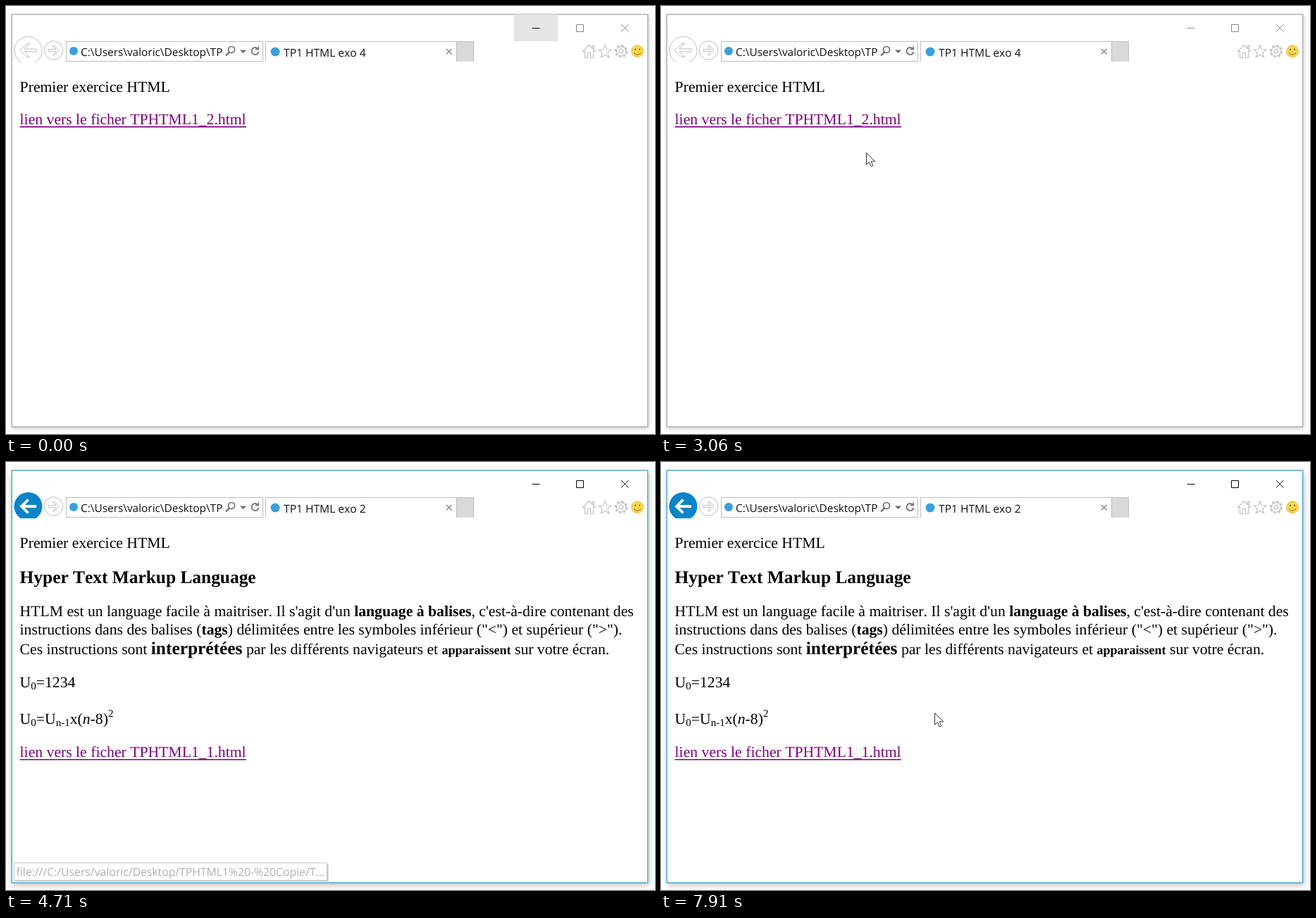
Animation of 921 by 608 pixels, one loop 8 s. Source, as an HTML page:

```html
<!DOCTYPE html>
<html lang="fr">
<head>
<meta charset="utf-8">
<title>TP1 HTML</title>
<style>
html, body { margin: 0; width: 100%; height: 100%; overflow: hidden; background: #fff; }
svg { position: absolute; left: 0; top: 0; }
.win {
  position: absolute; left: 8px; top: 12px; width: 903px; height: 586px;
  background: #fff;
  animation: shadow 8s step-end infinite;
}
.frame { fill: none; stroke-width: 1.4; animation: frame 8s step-end infinite; }
.ui { font-family: "Open Sans", "Noto Sans", sans-serif; fill: #111; }
.doc { font: 21.7px "Liberation Serif", "Times New Roman", serif; fill: #000; }
text { white-space: pre; font-kerning: none; text-rendering: geometricPrecision; }
.b { font-weight: bold; }
.h { font-size: 25.4px; font-weight: bold; }
.sm { font-size: 18px; font-weight: bold; }
.ix { font-size: 15px; }
.link { fill: purple; }
.line { fill: none; stroke: #bdbdbd; }
.dark { fill: none; stroke: #666; stroke-width: 1.7; }

/* Hard switches and fades */
.caps { fill: none; stroke: #858585; animation: caps 8s step-end infinite; }
.hover { animation: hover 8s linear infinite; }
.old { animation: old 8s step-end infinite; }
.new { animation: new 8s step-end infinite; }
.tip { animation: tip 8s linear infinite; }
.cursor { animation: move 8s linear infinite; }
.arrow { animation: arrow 8s step-end infinite; }
.hand { animation: hand 8s step-end infinite; }
.cursor path { fill: #fff; stroke: #333; stroke-linejoin: round; }

@keyframes shadow {
  0% { box-shadow: 1px 2px 6px rgba(0,0,0,.24); }
  56.25%, 100% { box-shadow: 1px 3px 9px rgba(0,0,0,.27); }
}
@keyframes frame { 0% { stroke: #b0b0b0; } 56.25%, 100% { stroke: #3fabc8; } }
@keyframes caps { 0% { stroke: #858585; } 56.25%, 100% { stroke: #000; } }
@keyframes hover { 0%, 9.5% { opacity: 1; } 12%, 100% { opacity: 0; } }
@keyframes old { 0% { opacity: 1; } 57.3%, 100% { opacity: 0; } }
@keyframes new { 0% { opacity: 0; } 57.3%, 100% { opacity: 1; } }
@keyframes tip {
  0%, 44.5% { opacity: 0; }
  47.2%, 57.3% { opacity: 1; }
  60.3%, 100% { opacity: 0; }
}
@keyframes arrow {
  0% { opacity: 0; }
  9% { opacity: 1; }
  44% { opacity: 0; }
  71.875%, 100% { opacity: 1; }
}
@keyframes hand { 0% { opacity: 0; } 44% { opacity: 1; } 57.3%, 100% { opacity: 0; } }
@keyframes move {
  0%, 9% { transform: translate(752px, 32px); animation-timing-function: cubic-bezier(.35,.1,.55,.95); }
  18.75% { transform: translate(552px, 452px); }
  22.5% { transform: translate(498px, 418px); }
  29% { transform: translate(352px, 300px); animation-timing-function: cubic-bezier(.25,.4,.6,.8); }
  38.25% { transform: translate(291px, 208px); }
  39.5% { transform: translate(288px, 200px); animation-timing-function: ease-out; }
  47.75%, 71.7% { transform: translate(274px, 169px); animation-timing-function: cubic-bezier(.35,.1,.6,.85); }
  81.75% { transform: translate(376px, 310px); animation-timing-function: ease-out; }
  88.875% { transform: translate(392px, 354px); animation-timing-function: step-end; }
  98.875%, 100% { transform: translate(388px, 356px); }
}
</style>
</head>
<body>
<div class="win"></div>
<svg width="921" height="608" viewBox="0 0 921 608">
  <defs>
    <clipPath id="bar"><path d="M9 40H85V80H9Z"/></clipPath>
  </defs>

  <!-- Window frame and buttons -->
  <rect class="frame" x="8.3" y="12" width="902.4" height="585.7"/>
  <g class="caps">
    <path d="M746.5 31.5H757.5M809.5 26.5H819.5V36.5H809.5ZM873 26L883.5 36.5M883.5 26L873 36.5"/>
  </g>
  <g class="hover">
    <path d="M720.5 12H783.5V50H720.5Z" fill="#e5e5e5"/>
    <path d="M746.5 31.5H757.5" stroke="#000"/>
  </g>

  <!-- Back and forward -->
  <g clip-path="url(#bar)">
    <g class="old line">
      <circle cx="31.5" cy="63" r="19.5"/>
      <path d="M19.5 63L29.5 53.5H33.5L26 61H43V65H26L33.5 72.5H29.5Z"/>
    </g>
    <g class="new">
      <circle cx="31.5" cy="63" r="20" fill="#0a84c6"/>
      <path d="M43 63H22M31.5 53.5L22 63L31.5 72.5" fill="none" stroke="#fff" stroke-width="3.8"/>
    </g>
    <g class="line">
      <circle cx="67.5" cy="63" r="13.3"/>
      <path d="M75.5 63L69 56.5H66.5L71 61.5H60V64.5H71L66.5 69.5H69Z"/>
    </g>
  </g>

  <!-- Address field and tab -->
  <g class="ui">
    <path class="line" d="M85.5 50.5H364.5V78.5H85.5ZM368.5 79V50.5H640"/>
    <path d="M639.5 50H664V79H639.5Z" fill="#d9d9d9"/>
    <path class="line" d="M639.5 79V50.5H663.5V79"/>
    <circle cx="96" cy="64" r="6" fill="#38a0dc"/>
    <circle cx="382" cy="65" r="6.5" fill="#38a0dc"/>
    <text x="106" y="70.5" font-size="15.4">C:\Users\valoric\Desktop\TP</text>
    <g font-size="15.6">
      <text class="old" x="394" y="71.5">TP1 HTML exo 4</text>
      <text class="new" x="394" y="71.5">TP1 HTML exo 2</text>
    </g>
    <g class="dark">
      <circle cx="320" cy="62" r="4.5"/>
      <path d="M317 65.5L312 70.5" stroke-width="2.2"/>
      <path d="M357 60.5A5 5 0 1 0 358.5 65"/>
      <path d="M354 61.5H358.2V57.2" stroke-width="1.5"/>
      <path d="M625 61L632.5 68.5M632.5 61L625 68.5" stroke="#858585" stroke-width="1.4"/>
    </g>
    <path d="M332 62.5H341L336.5 67Z" fill="#666"/>
  </g>

  <!-- Toolbar icons -->
  <g class="line" stroke-width="1.1">
    <path d="M818.5 64.5L827.5 55.5L836.5 64.5H833.5V73.5H829.5V66.5H825.5V73.5H821.5V64.5ZM832.5 60V56.5H834.5V62"/>
    <path d="M850 55.5L852.4 61.7L859 62L853.9 66.2L855.6 72.8L850 69.2L844.4 72.8L846.1 66.2L841 62L847.6 61.7Z"/>
    <circle cx="873" cy="64.3" r="6.7"/>
    <circle cx="873" cy="64.3" r="8.2" stroke-width="2" stroke-dasharray="3.22"/>
    <circle cx="873" cy="64.3" r="3"/>
  </g>
  <circle cx="896" cy="64.3" r="8.5" fill="#f8d64e" stroke="#e6c24a"/>
  <g fill="none" stroke="#7d6628">
    <path d="M893 60.5V63M899 60.5V63" stroke-width="1.6"/>
    <path d="M891 66.5Q896 72 901 66.5"/>
  </g>

  <!-- Pages -->
  <g class="doc">
    <text x="19.6" y="121.5">Premier exercice HTML</text>
    <g class="old link">
      <text x="19.6" y="168">lien vers le ficher TPHTML1_2.html</text>
      <path d="M19.6 170.8H341V172.4H19.6Z"/>
    </g>
    <g class="new">
      <text class="h" x="19.6" y="171.8">Hyper Text Markup Language</text>
      <text x="19.6" y="219.2">HTLM est un language facile à maitriser. Il s'agit d'un <tspan class="b">language à balises</tspan>, c'est-à-dire contenant des</text>
      <text x="19.6" y="244.7">instructions dans des balises (<tspan class="b">tags</tspan>) délimitées entre les symboles inférieur ("&lt;") et supérieur ("&gt;").</text>
      <text x="19.6" y="272.7">Ces instructions sont <tspan class="h">interprétées</tspan> par les différents navigateurs et <tspan class="sm">apparaissent</tspan> sur votre écran.</text>
      <text x="19.6" y="319.7">U<tspan class="ix" dy="3.3">0</tspan><tspan dy="-3.3">=1234</tspan></text>
      <text x="19.6" y="371.5">U<tspan class="ix" dy="3.3">0</tspan><tspan dy="-3.3">=U</tspan><tspan class="ix" dy="3.3">n-1</tspan><tspan dy="-3.3">x(</tspan><tspan font-style="italic">n</tspan>-8)<tspan class="ix" dy="-9.5">2</tspan></text>
      <g class="link">
        <text x="19.6" y="419.3">lien vers le ficher TPHTML1_1.html</text>
        <path d="M19.6 422H341V423.6H19.6Z"/>
      </g>
    </g>
  </g>

  <!-- Link address bubble -->
  <g class="tip ui">
    <path d="M13 571H457.5V596H13Z" fill="#8a8a8a"/>
    <path d="M11.5 569.5H455.5V594.5H11.5Z" fill="#fff" stroke="#8a8a8a"/>
    <text x="14.5" y="588" font-size="15.75" fill="#555">file:///C:/Users/valoric/Desktop/TPHTML1%20-%20Copie/T...</text>
  </g>

  <g class="cursor">
    <path class="arrow" d="M.5 .5V17.3L4.4 13.7L7.2 20.2L9.8 19.1L7.1 12.9H12.8Z"/>
    <path class="hand" d="M-2 1.5C-2 -.5 2 -.5 2 1.5V7C3 5.5 5.5 6 5.5 8C7 6.8 8.8 7.5 8.8 9.3C10 8.6 11 9.5 11 11V16C11 21 9 24.5 5 24.5H2C-1 24.5 -2.5 22 -4 19.5L-7.5 14.5C-8 12.5 -5.5 12 -4.2 13.3L-2 15.5ZM2 7V11.5M5.5 8V11.5M8.8 9.3V12"/>
  </g>
</svg>
</body>
</html>
```
